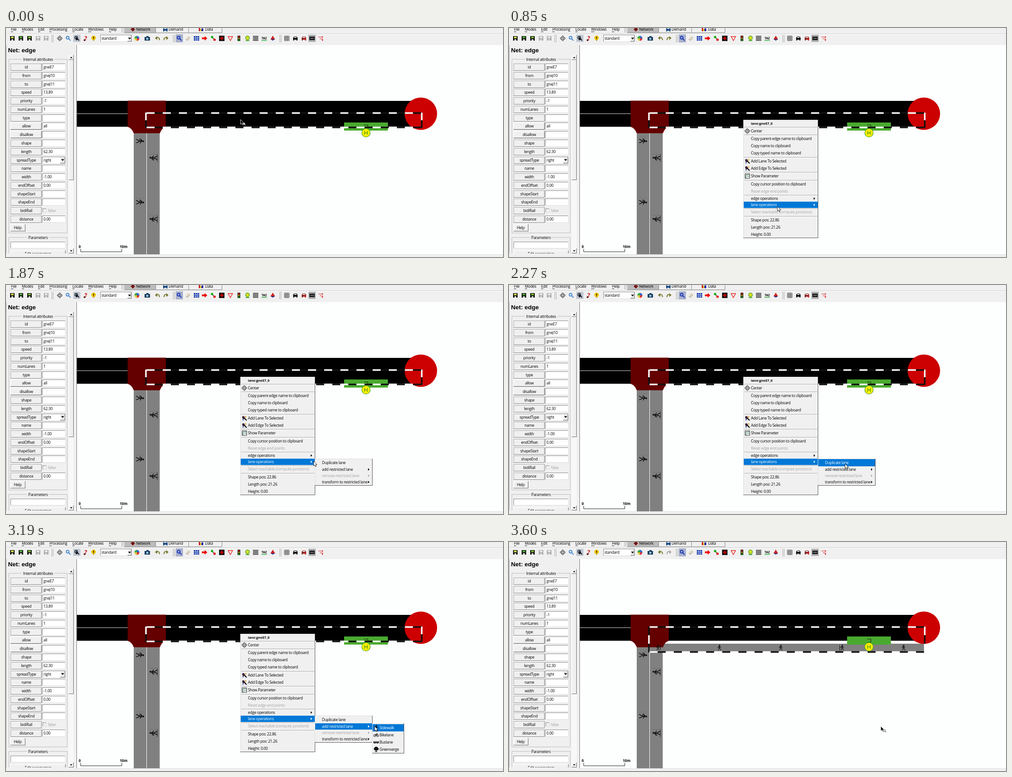
Recreate the animation shown at these times as an HTML page with a canvas. Size 1101x509 px, loop 4200 ms.

```html
<!DOCTYPE html>
<html lang="en">
<head>
<meta charset="utf-8">
<title>Adding a sidewalk lane</title>
<style>
html, body { margin: 0; width: 100%; height: 100%; overflow: hidden; background: #f0f0f0; }
canvas { display: block; }
</style>
</head>
<body>
<canvas id="stage" width="1101" height="509"></canvas>
<script>
const g = document.getElementById('stage').getContext('2d');
const LOOP = 4200, FACE = '#f0f0f0', BLUE = '#0078d7', GREEN = '#4aaa30', ROAD = '#808080';

// ---- drawing helpers ----
function rect(x, y, w, h, c) { g.fillStyle = c; g.fillRect(x, y, w, h); }
function disc(x, y, r, c) { g.fillStyle = c; g.beginPath(); g.arc(x, y, r, 0, 7); g.fill(); }
function fill(d, c) { g.fillStyle = c; g.fill(new Path2D(d)); }
function line(d, c, w = 1) { g.strokeStyle = c; g.lineWidth = w; g.stroke(new Path2D(d)); }
function text(s, x, y, o = {}) {
  g.font = `${o.bold ? 'bold ' : ''}${o.size || 8.5}px ${o.font || '"Open Sans", "Noto Sans"'}, sans-serif`;
  g.letterSpacing = o.size ? '0px' : '-0.3px';
  g.fillStyle = o.color || '#000';
  g.textAlign = o.align || 'left';
  g.fillText(s, x, Math.round(y));
}
function bevel(x, y, w, h, bg, light, dark) {
  rect(x, y, w, h, dark);
  rect(x, y, w - 1, h - 1, light);
  rect(x + 1, y + 1, w - 2, h - 2, bg);
}
const raised = (x, y, w, h) => bevel(x, y, w, h, FACE, '#fff', '#696969');
const sunken = (x, y, w, h, bg = '#fff') => bevel(x, y, w, h, bg, '#888', '#ddd');
function at(x, y, draw, turn = 0, size = 1) {
  g.save(); g.translate(x, y); g.rotate(turn); g.scale(size, size); draw(); g.restore();
}
function walker(x, y, turn = 0, size = 1) {
  at(x, y, () => {
    disc(0.5, -5, 1.4, '#111');
    line('M0 -3.5L0 1.5', '#111', 2);
    line('M0 1L-2.8 6.2M0 1L2 3L3 6.2M-.3 -3L-3 -1V1M.3 -3L2 -1L3.8 0', '#111', 1.2);
  }, turn, size);
}
function dashes(x1, y1, x2, y2, n, white) {
  for (let i = 0; i < n; i++) {
    const px = k => x1 + (x2 - x1) * k / n, py = k => y1 + (y2 - y1) * k / n;
    line(`M${px(i)} ${py(i)}L${px(i + 1)} ${py(i + 1)}`, (i % 2 === 0) === white ? '#fff' : '#111', 3.4);
  }
}

// ---- menu bar and toolbar ----
function floppy(c, body = '#111') {
  rect(-5, -5, 10, 10, body);
  rect(-3, -4, 6, 4, c);
  rect(-2, 2, 4, 3, '#ddd');
}
function lens(c) { line('M1 1L5 5', c, 2); g.beginPath(); g.arc(-1.5, -1.5, 3, 0, 7); g.stroke(); }
function car(c) {
  fill('M-5 3V-1L-3 -4H3L5 -1V3Z', c);
  rect(-2.5, -3, 5, 2, '#fff');
  rect(-4.5, 3, 2, 2, c); rect(2.5, 3, 2, 2, c);
}
function grid(c, n, w) {
  for (let i = 0; i <= n; i++) {
    const p = -5 + 10 * i / n;
    line(`M${p} -5V5M-5 ${p}H5`, c, w);
  }
}
function moveCross() {
  const d = 'M0 -6L2.5 -3.5H1V-1H3.5V-2.5L6 0L3.5 2.5V1H1V3.5H2.5L0 6L-2.5 3.5H-1V1H-3.5V2.5L-6 0L-3.5 -2.5V-1H-1V-3.5H-2.5Z';
  fill(d, '#fff');
  line(d, '#222', 1);
}
const undoArrow = c => { line('M-3 -1Q4 -4 4 4', c, 2); fill('M-6 -.5L-1 -5V3.5Z', c); };
const icons = [
  [14, () => floppy('#c8d048')], [33, () => floppy('#48a030')], [52, () => floppy('#70b030')],
  [71, () => floppy('#e8e8e8', '#aaa')], [89, () => floppy('#e8e8e8', '#aaa')],
  [119, moveCross], [138, () => lens('#4a8ad0')],
  [157, () => { rect(-8, -8, 16, 16, '#c4c8d2'); lens('#345'); fill('M-2 -4L5 3H1L-2 5Z', '#111'); }],
  [176, () => { text('?', -2, 4, { size: 12, bold: true, color: '#c00' }); disc(-2, 4, 2, '#511'); }],
  [194, () => { disc(0, -1, 5, '#e8c800'); fill('M-2 3H2L0 6Z', '#a80'); rect(-1, -4, 2, 5, '#630'); }],
  [290, () => ['#d33', '#dc3', '#3a4', '#36c'].forEach((c, i) => {
    g.fillStyle = c; g.beginPath(); g.moveTo(0, 0);
    g.arc(0, 0, 5.5, i * Math.PI / 2, (i + 1) * Math.PI / 2); g.fill();
  })],
  [313, () => { rect(-6, -3, 12, 8, '#1b3c60'); rect(-2, -5, 5, 2, '#1b3c60'); disc(0, 1, 2.5, '#9cd'); }],
  [336, () => undoArrow('#77772c')],
  [384, () => { rect(-8, -9, 16, 18, '#a9b0cc'); lens('#1838b8'); }],
  [403, () => { fill('M-5 2L1 -5L5 -2L-1 5Z', '#ddd4bb'); line('M-5 2L-1 5L5 -2', '#a99', 1); }],
  [422, () => { rect(-6, -5, 12, 10, '#1238a8'); line('M-6 -1.5H6M-6 2H6M-2 -5V5M2 -5V5', '#fff', .8); }],
  [440, () => fill('M-6 -2H0V-5L6 0L0 5V2H-6Z', '#e00')],
  [459, () => { line('M-3 -3L3 3', '#333', 1.5); disc(-2.5, -3, 2.6, '#1a1'); disc(3, 3, 2.6, '#d00'); }],
  [478, () => { rect(-6, -6, 12, 12, '#111'); line('M-4 0H4M0 -4V4', '#c00', 2.5); }],
  [497, () => line('M-5 -4H5L0 5Z', '#e22', 1.4)],
  [516, () => { rect(-3, -6, 6, 12, '#222'); disc(0, -4, 1.6, '#e00'); disc(0, 0, 1.6, '#ec0'); disc(0, 4, 1.6, '#0b0'); }],
  [535, () => { disc(0, -1, 5, '#5a3'); disc(0, -1, 3.4, '#dd2'); rect(-4, 4, 8, 2, '#5a3'); }],
  [553, () => line('M-6 -4.5H6M-6 -1.5H6M-6 1.5H6M-6 4.5H6', '#111', 1.4)],
  [572, () => { text('TAZ', 0, 2, { size: 6.5, bold: true, align: 'center' }); line('M-6 4.5H6', '#2a3', 1.5); }],
  [591, () => { fill('M0 -6L5 2H-5Z', '#c22'); fill('M-5 2H5L0 5Z', '#238'); }],
  [622, () => grid('#333', 3, 1)], [641, () => car('#111')],
  [660, () => { car('#822'); disc(3, 2, 2, '#d22'); }],
  [678, () => { rect(-8, -8, 16, 16, '#b0b0b0'); rect(-6, -4, 12, 8, '#222'); line('M-4 0H4', '#bbb', 1); }],
  [697, () => { line('M-5 -3H4M-2 1H4V4', '#d22', 1.2); fill('M3 -5L6 -3L3 -1ZM2 3H6L4 6Z', '#d22'); }]
];
function grip(x, y, h) { line(`M${x} ${y}v${h}m3 0v${-h}`, '#aaa'); }

function toolbars(done) {
  rect(0, 0, 1101, 38, FACE);
  const menus = [['File', 11], ['Modes', 35], ['Edit', 71], ['Processing', 96], ['Locate', 147], ['Windows', 182], ['Help', 228]];
  for (const [s, x] of menus) { text(s, x, 6); rect(x, 8, s === 'Windows' ? 7 : 5, 1, '#333'); }
  grip(256.5, 0, 10);
  rect(262, 0, 69, 10, '#bcbcbc');
  line('M331.5 0V10.5H262M404.5 0V10.5H332M478.5 0V10.5H405', '#888');
  fill('M276 3L281 -2L286 3L281 8Z', '#a11'); line('M277 3H285M281 0V7', '#222', 1.2);
  at(353, 3, () => car('#1a4a80'));
  rect(427, 0, 3, 7, '#c22'); rect(430, 2, 3, 5, '#dc2'); rect(433, 1, 4, 6, '#22a');
  text('Network', 288, 6); text('Demand', 360, 6); text('Data', 441, 6);
  line('M0 12.5H1101', '#ccc'); line('M0 13.5H1101', '#fff');
  for (const x of [101.5, 370.5, 606.5]) grip(x, 15, 17);
  sunken(209, 15, 70, 16);
  text('standard', 211.5, 26);
  raised(269, 16, 9, 14);
  fill('M270.5 21.5H277L273.7 25.5Z', '#000');
  for (const [x, draw] of icons) at(x, 23, draw);
  g.save(); g.translate(354, 23); g.scale(-1, 1); undoArrow(done ? '#a4a4a4' : '#77772c'); g.restore();
}

// ---- attribute panel ----
const attributes = [
  ['id', 'gneE7'], ['from', 'gneJ10'], ['to', 'gneJ11'], ['speed', '13.89'], ['priority', '-1'],
  ['numLanes', '1'], ['type', ''], ['allow', 'all'], ['disallow', ''], ['shape', ''], ['length', '62.30'],
  ['spreadType', 'right'], ['name', ''], ['width', '-1.00'], ['endOffset', '0.00'], ['shapeStart', ''],
  ['shapeEnd', ''], ['bidiRail', null], ['distance', '0.00']
];
function group(title, y, h, gap) {
  g.strokeStyle = '#bbb'; g.lineWidth = 1; g.strokeRect(6.5, y + .5, 129, h);
  rect(71 - gap, y - 3, gap * 2, 7, FACE);
  text(title, 71, y + 4, { align: 'center' });
}
function panel() {
  rect(0, 38, 157, 471, FACE);
  line('M0 37.5H1101', '#888');
  line('M.5 38V503', '#aaa');
  line('M156.5 38V503', '#777');
  text('Net: edge', 4.5, 54, { size: 13.5, bold: true, font: '"Liberation Sans"' });
  group('Internal attributes', 69, 386, 36);
  attributes.forEach(([name, value], i) => {
    const y = 87 + i * 18.78, top = Math.round(y - 8);
    const button = name === 'allow' || name === 'disallow';
    bevel(10, top, 69, 16, FACE, button ? '#fff' : '#aaa', button ? '#555' : '#888');
    text(name, 45, y + 3, { align: 'center' });
    if (value === null) {
      sunken(81, top + 3, 9, 9, FACE);
      text('false', 93, y + 3, { color: '#a0a0a0' });
    } else {
      sunken(80, top, 52, 16);
      text(value, 83, y + 3);
    }
    if (name === 'spreadType') {
      raised(120, top + 1, 11, 14);
      fill(`M122 ${y - 2}H129L125.5 ${y + 2}Z`, '#000');
    }
  });
  raised(10, 436, 33, 16);
  text('Help', 26, 447, { align: 'center' });
  group('Parameters', 465, 60, 23);
  sunken(10, 475, 122, 15);
  raised(10, 494, 122, 16);
  text('Edit parameters', 71, 505, { align: 'center' });
  rect(0, 501, 156, 8, FACE);
  rect(139, 60, 11, 441, '#f8f8f8');
  raised(139, 60, 11, 11); raised(139, 71, 11, 267); raised(139, 490, 11, 11);
  fill('M142 67H147L144.5 64Z', '#000');
  fill('M142 494H147L144.5 497Z', '#000');
}

// ---- road network ----
function network(done) {
  rect(157, 38, 944, 465, '#fdfefe');
  rect(157, 162, 762, 57.5, '#000');
  rect(157, 190, 113, 1, '#ddd');
  if (done) rect(312, 226, 608, 18, ROAD);
  rect(283, 234, 57.5, 269, ROAD);
  rect(311, 234, 1, 269, '#fff');
  fill('M269.5 161.5H354V219.5Q344.5 223 341 234H283Q279 223 269.5 219.5Z', '#640000');
  disc(919, 190.5, 36, '#cc0000');
  for (const y of [0, 136]) {
    walker(297, 251 + y, Math.PI / 2, 1.4);
    walker(327, 289 + y, -Math.PI / 2, 1.4);
    line(`M335 ${280.5 + y}V${297.5 + y}`, '#222', 1);
    line(`M288 ${242 + y}H306M318 ${280.5 + y}H335`, '#6a6a6a', .7);
  }
  if (done) {
    for (let x = 330; x < 900; x += 136) walker(x, 234.5);
    line('M335.5 229V240M732.5 229V241', '#111', 1);
  }
  rect(749, 210, 97, 18, GREEN);
  line(done ? 'M793 215.5H801.5V223H793' : 'M793 215.5H801.5V219', '#16330c', 1.2);

  const bottom = done ? 244.5 : 221, sides = done ? 3 : 2;
  dashes(310, 188, 310, bottom + 1, sides, !done);
  dashes(921, 188, 921, bottom + 1, sides, true);
  dashes(311.5, 189, 919.5, 189, 34, true);
  dashes(311.5, bottom, 919.5, bottom, 34, true);
  disc(797.5, 233, 10, GREEN);
  disc(797.5, 233, 8.7, '#ffee00');
  line('M794.5 229V237.5M800.5 229V237.5M794.5 233H800.5', '#4a9a20', 1.3);

  line('M165.5 491V497.5H256.5V491', '#222');
  text('0', 161, 489, { bold: true, size: 8 });
  text('10m', 252, 489, { bold: true, size: 8 });
  rect(157, 503, 944, 6, FACE);
  line('M157 503.5H1101', '#ddd');
}

// ---- popup menus ----
const wand = () => { line('M-4 -4L5 5', '#111', 2.4); fill('M-5 -2L-1 -5L2 0L-3 3Z', '#3a2038'); disc(3, -3, 1.4, '#d90'); disc(-3, 4, 1.3, '#36b'); };
const sheet = () => { g.lineWidth = 1; g.strokeStyle = '#222'; g.strokeRect(-5, -5, 10, 10); rect(-2, -2, 6, 6, '#fff'); line('M-3 5V-2.5H5M-1 1H4', '#264', 1); };
const bike = () => { g.lineWidth = 1; g.strokeStyle = '#111'; for (const x of [-3.3, 3.3]) { g.beginPath(); g.arc(x, 1.5, 2.3, 0, 7); g.stroke(); } line('M-3.3 1.5L-1 -2H2L3.3 1.5M-1 -2L0 1.5L2 -2L1.5 -3.5H3', '#111', .9); };
const bus = () => { rect(-6, -2, 12, 4, '#111'); line('M-5 -.5H5', '#ddd', 1); disc(-3, 2, 1, '#111'); disc(3, 2, 1, '#111'); };
const tree = () => { disc(0, -2, 4, '#111'); disc(-2, -1, 3, '#111'); disc(2.5, -1, 3, '#111'); rect(-1, 1, 2, 4, '#111'); rect(-3, 4.5, 6, 1, '#111'); };

// Each item: label, centre y, kind ('title', 'info', 'off', 'sub') and icon.
const mainMenu = {
  x: 519, y: 204, w: 166, h: 263, tx: 536, ix: 528,
  seps: [220, 237, 287, 320, 338, 371, 401, 418],
  items: [
    ['lane:gneE7_0', 212, 'title'], ['Center', 229, '', moveCross],
    ['Copy parent edge name to clipboard', 246], ['Copy name to clipboard', 262], ['Copy typed name to clipboard', 278],
    ['Add Lane To Selected', 296, '', wand], ['Add Edge To Selected', 312, '', wand], ['Show Parameter', 329, '', sheet],
    ['Copy cursor position to clipboard', 347], ['Reset edge end points', 363, 'off'],
    ['edge operations', 379, 'sub'], ['lane operations', 393, 'sub'],
    ['Select reachable (compute junctions)', 409, 'off'],
    ['Shape pos: 22.86', 427, 'info'], ['Length pos: 21.26', 443, 'info'], ['Height: 0.00', 459, 'info']
  ]
};
const laneMenu = {
  x: 684, y: 386, w: 128, h: 60, tx: 700, ix: 692, seps: [],
  items: [['Duplicate lane', 395], ['add restricted lane', 410, 'sub'], ['remove restricted lane', 424, 'off'], ['transform to restricted lane', 438, 'sub']]
};
const kindMenu = {
  x: 811, y: 403, w: 71, h: 67, tx: 827.5, ix: 820, seps: [],
  items: [['Sidewalk', 413, '', () => walker(0, 0)], ['Bikelane', 429, '', bike], ['Buslane', 445, '', bus], ['Greenverge', 461, '', tree]]
};
function popup(m, hoverY) {
  bevel(m.x, m.y, m.w, m.h, FACE, '#ddd', '#555');
  for (const y of m.seps) {
    rect(m.x + 2, y, m.w - 4, 1, '#a8a8a8');
    rect(m.x + 2, y + 1, m.w - 4, 1, '#fff');
  }
  for (const [label, y, kind = '', icon] of m.items) {
    const hot = (kind === '' || kind === 'sub') && Math.abs(hoverY - y) <= 7.2;
    if (hot) {
      const half = kind === 'sub' ? 7 : 8;
      rect(m.x + 1, y - half, m.w - 2, half * 2, BLUE);
    }
    const color = hot ? '#fff' : kind === 'off' ? '#a4a4a4' : '#000';
    const title = kind === 'title';
    text(label, m.tx, y + 3, { color, bold: title, size: title ? 7.5 : 0 });
    if (icon) at(m.ix, y, icon);
    const arrow = m.x + m.w - 10;
    if (kind === 'sub' || label.startsWith('remove')) fill(`M${arrow} ${y - 2.7}l3.2 2.7l-3.2 2.7Z`, color);
  }
}

// ---- pointer: time, x, y ----
const moves = [
  [0, 519, 203], [220, 519, 204], [460, 523, 209], [540, 532, 226], [620, 545, 250], [690, 561, 277],
  [780, 583, 345], [850, 594, 396], [910, 600, 394], [990, 603, 392], [1070, 604, 391], [1230, 611, 391],
  [1630, 618, 391], [1710, 635, 391], [1790, 659, 391], [1870, 681, 391], [1940, 702, 391], [2020, 722, 391], [2100, 735, 391],
  [2180, 739, 393], [2260, 744, 397], [2330, 749, 402], [2410, 753, 406], [2480, 755, 408],
  [2940, 763, 408], [3020, 780, 408], [3100, 800, 408], [3180, 816, 409], [3260, 823, 409]
];
function pointer(x, y, zoom) {
  at(x + .5, y + .5, () => {
    const d = 'M0 0V10.5L2.5 8.3L4.3 12.3L6 11.5L4.3 7.7H7.6Z';
    fill(d, zoom ? '#000' : '#fff');
    line(d, zoom ? '#fff' : '#000', .8);
    if (zoom) {
      g.beginPath(); g.arc(8, 9.5, 2.3, 0, 7);
      g.fillStyle = '#eee'; g.fill();
      g.strokeStyle = '#555'; g.lineWidth = .9; g.stroke();
      line('M9.5 11L12 13.5', '#777', 1.5);
    }
  });
}

function draw(t) {
  const done = t >= 3600;
  const [, x, y] = moves.findLast(m => m[0] <= t);
  network(done);
  panel();
  toolbars(done);
  if (t >= 220 && !done) popup(mainMenu, t >= 850 ? 393 : y);
  if (t >= 1230 && t < 3510) popup(laneMenu, t >= 2720 ? 410 : x > 686 ? y + 2 : 0);
  if (t >= 2720 && t < 3420) popup(kindMenu, x > 812 ? y + 2 : 0);
  pointer(x, y, t < 220 || t >= 3420);
}
function tick(now) {
  draw(now % LOOP);
  requestAnimationFrame(tick);
}
requestAnimationFrame(tick);
</script>
</body>
</html>
```
